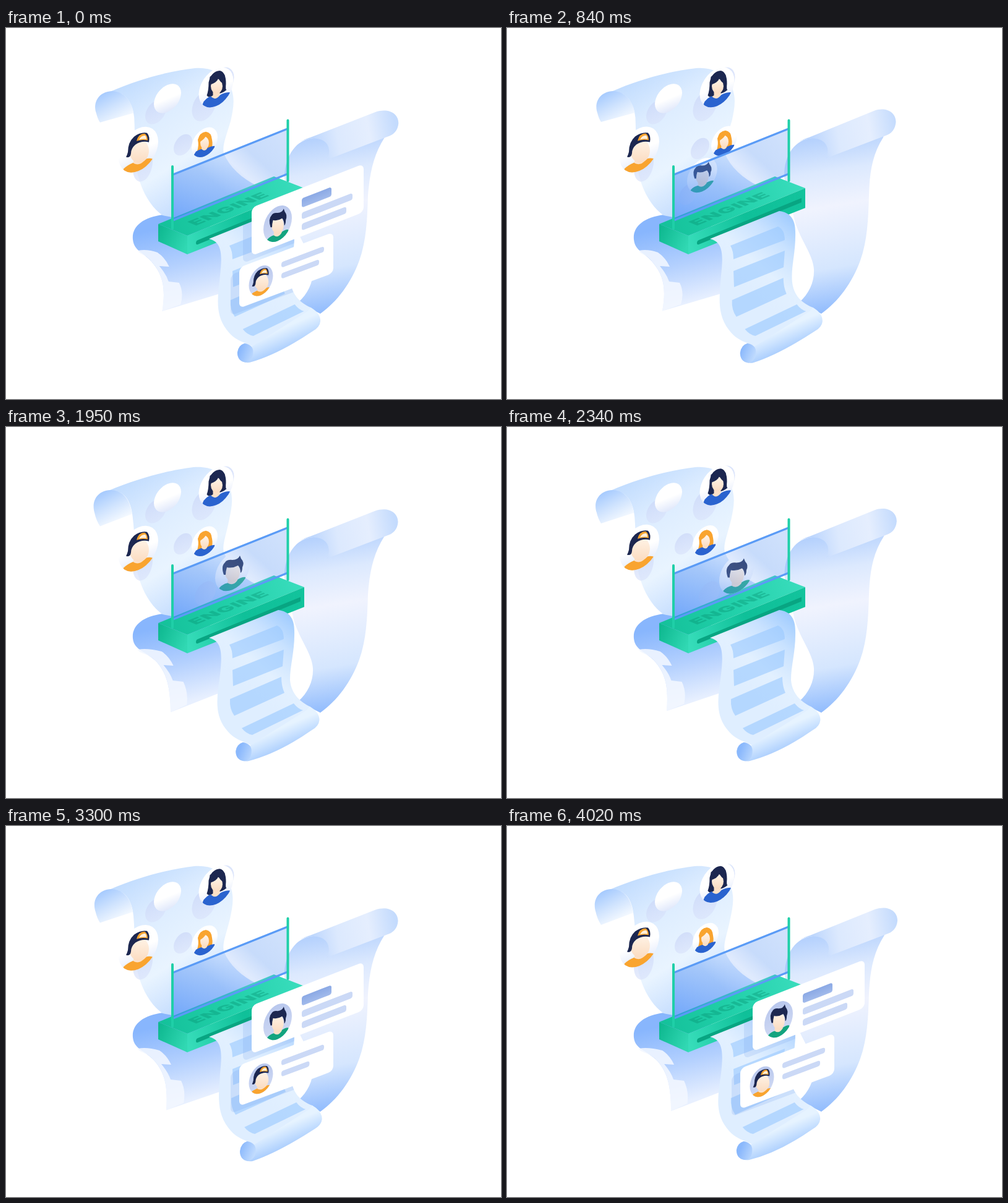
Animation, 800 px wide and 600 px high, one loop 4050 ms. Source, as an HTML page:

```html
<!DOCTYPE html>
<html lang="en">
<head>
<meta charset="utf-8">
<title>Engine</title>
<style>
html, body { margin: 0; width: 100%; height: 100%; overflow: hidden; background: #fff; }
svg { display: block; width: 100vw; height: 100vh; }
text { font: 900 22px Inter, Roboto, sans-serif; letter-spacing: .5px; }
</style>
</head>
<body>
<svg viewBox="0 0 800 600">
  <defs id="defs"></defs>

  <path id="tail" fill="url(#gTail)"/>
  <path id="flap" fill="#f3f8ff" opacity=".88"/>
  <path id="leftSheet" fill="url(#gLeft)"/>
  <path id="leftCurl" fill="url(#gCurl)"/>

  <g id="shades" fill="url(#gShade)"></g>
  <g id="discs"></g>

  <path id="rightSheet" fill="url(#gRight)"/>
  <path id="rightRoll" fill="url(#gRoll)"/>

  <path d="M246 317L433 240L482 259L293 336Z" fill="url(#gTop)"/>
  <path d="M246 317L293 336V366L246 345Z" fill="url(#gSide)"/>
  <path d="M293 336L482 259V291L293 366Z" fill="url(#gFront)"/>
  <path d="M310 343L476 275V282L310 350Q307 351 307 348Q307 344 310 343Z" fill="#08a582"/>
  <text transform="matrix(1.4 -.57 .9 .37 306 320)" fill="#05906f" opacity=".36">ENGINE</text>

  <g id="guest"></g>

  <path d="M270 237L455 163V236L270 311Z" fill="url(#gGlass)"/>
  <path d="M270 237L455 163M270 311L455 236" stroke="#5a9bf6" stroke-width="3.2"/>
  <path d="M269 224V324M455.5 149.500V247" stroke="#1fcfa8" stroke-width="4" stroke-linecap="round"/>

  <path id="outSheet" fill="url(#gOut)"/>
  <path id="stripes" fill="#9ccaff" opacity=".62"/>
  <g clip-path="url(#sheetClip)" fill="#7ea9ee" opacity=".22">
    <g id="bigShadow"></g>
    <g id="smallShadow"></g>
  </g>
  <path id="outRoll" fill="url(#gOutRoll)"/>
  <path id="outEnd" fill="url(#gOutEnd)"/>

  <g id="small"></g>
  <g id="big"></g>
</svg>

<script>
const LOOP = 4050, RESTART = 330, TAIL_TIME = 4600;
const NAVY = '#1c2750', BLUE = '#2a63cf', ORANGE = '#f9a42f', GREEN = '#14a47f';
const $ = id => document.getElementById(id);
const attr = (id, name, value) => $(id).setAttribute(name, value);
const clamp = v => Math.max(0, Math.min(1, v));
const ramp = (t, a, b) => { const k = clamp((t - a) / (b - a)); return k * k * (3 - 2 * k); };
const wave = (t, peak, period) => Math.cos(2 * Math.PI * (t - peak) / period);

// Gradients: id, axis in stage pixels (or null for the shape's own box), stops
function gradient(id, axis, ...stops) {
  const [x1, y1, x2, y2] = axis || [0, 0, 0, 1];
  const units = axis ? 'userSpaceOnUse' : 'objectBoundingBox';
  const list = stops.map(([at, color, alpha = 1]) =>
    `<stop offset="${at}" stop-color="${color}" stop-opacity="${alpha}"/>`).join('');
  return `<linearGradient id="${id}" gradientUnits="${units}" x1="${x1}" y1="${y1}" x2="${x2}" y2="${y2}">${list}</linearGradient>`;
}

const skewCircle = (r, stretch = 1.08, extra = '') =>
  `<circle r="${r}" transform="matrix(1 -.41 0 ${stretch} 0 0)" ${extra}/>`;
const clip = (id, shape) => `<clipPath id="${id}">${shape}</clipPath>`;

$('defs').innerHTML =
  gradient('gLeft', [165, 90, 300, 310], [0, '#bcd9fe'], [.3, '#dcecff'], [.65, '#e9f4ff'], [1, '#bdd8fe']) +
  gradient('gCurl', [160, 104, 185, 150], [0, '#a7cbfe'], [.5, '#cfe3fe'], [1, '#f4f9ff']) +
  gradient('gTail', [262, 320, 292, 445], [0, '#88b6fd'], [.5, '#b3d0fe'], [1, '#e8f0ff']) +
  gradient('gRight', [480, 180, 525, 460], [0, '#b3d0fd'], [.2, '#dce9fe'], [.4, '#f0f3fe'], [.75, '#d5e6fe'], [1, '#90bbfd']) +
  gradient('gRoll', [485, 185, 630, 160], [0, '#b6d2fd'], [.35, '#dce9fe'], [.7, '#e5eefe'], [1, '#c4dbfd']) +
  gradient('gOut', [462, 302, 372, 410], [0, '#9dcafe'], [.35, '#c9e2ff'], [.7, '#e2f0ff'], [1, '#dfeeff']) +
  gradient('gOutRoll', [425, 495, 440, 530], [0, '#e6f3ff'], [.4, '#cce3ff'], [1, '#a3c9fd']) +
  gradient('gOutEnd', [378, 520, 404, 530], [0, '#8ab8fc'], [1, '#c5defe']) +
  gradient('gTop', [250, 320, 480, 255], [0, '#14c19a'], [.5, '#22d0aa'], [1, '#3addbd']) +
  gradient('gSide', [246, 330, 293, 350], [0, '#0fb991'], [1, '#31d8b3']) +
  gradient('gFront', [293, 350, 482, 275], [0, '#37ddba'], [.5, '#0fc099'], [1, '#12c39c']) +
  gradient('gGlass', [285, 320, 430, 160], [0, '#3f86f8', .62], [.4, '#5c97f4', .42],
    [.6, '#8fb6fa', .28], [.75, '#5090f3', .32], [1, '#6aa1f6', .32]) +
  gradient('gShade', null, [0, '#ccd8f8', .75], [1, '#d9e2fb', .65]) +
  gradient('gDisc', null, [0, '#fff'], [.5, '#fff'], [1, '#e0e8fb']) +
  gradient('gBadge', null, [0, '#b8c7ed'], [1, '#d2dbf4']) +
  gradient('gTitle', null, [0, '#8ba9e5'], [1, '#a1baeb']) +
  gradient('gSkin', null, [0, '#fff4e8'], [1, '#fbdcc1']) +
  clip('sheetClip', '<path id="sheetShape"/>') +
  [['cap', 32], ['girl', 28], ['blonde', 21], ['guy', 28]].map(([n, r]) => clip(n + 'Clip', skewCircle(r))).join('') +
  clip('bigClip', skewCircle(23, 1.22)) + clip('smallClip', skewCircle(19.5, 1.2));

const shape = (d, fill) => `<path d="${d}" fill="${fill}"/>`;
const skin = (x, y, rx, ry) => `<ellipse cx="${x}" cy="${y}" rx="${rx}" ry="${ry}" fill="url(#gSkin)"/>`;
const people = {
  cap: shape('M-34 50L-24 31Q-18 25 -8 21Q4 23 12 15Q18 13 23 15L36 50Z', ORANGE) +
    shape('M-8 10L10 6V17Q2 27 -8 22Z', '#fce0c6') + skin(1, 2, 16, 19) +
    shape('M-17 4Q-17 -12 -7 -21Q4 -29 14 -27Q19 -21 17 -12Q5 -15 -5 -8Q-12 -2 -12 6Q-13 14 -20 12Q-18 8 -17 4Z', NAVY) +
    shape('M-3 -14Q0 -26 10 -26Q15 -23 15 -15Q6 -17 -3 -14Z', ORANGE) +
    shape('M1 -16Q4 -23 11 -23Q13 -21 13 -17Q7 -18 1 -16Z', '#fff0dc'),
  girl: shape('M-15 13Q-12 5 -12 -8Q-8 -26 6 -27Q16 -25 16 -6Q15 4 17 4Q10 10 3 10L-6 14Q-12 18 -15 13Z', NAVY) +
    shape('M-27 40L-20 23Q-15 17 -9 14Q-2 21 7 12Q14 8 22 8L29 40Z', BLUE) +
    shape('M-5 6H6V13Q-1 22 -8 15L-5 13Z', '#fce0c6') + skin(1, -2, 9.500, 12) +
    shape('M-11 -4Q1 -7 4 -15Q6 -8 13 -6L14 -20L2 -26L-10 -17Z', NAVY),
  blonde: shape('M-12 14Q-9 6 -11 -4Q-8 -16 2 -17Q11 -16 12 -4Q14 6 10 11Q0 17 -12 14Z', ORANGE) +
    shape('M-22 28L-14 15Q-9 12 -5 11Q0 15 5 9Q11 6 16 6L22 28Z', BLUE) +
    shape('M-4 6H4V10Q1 16 -5 11Z', '#fce0c6') + skin(0, 1, 7, 10) +
    shape('M-9 0Q-1 -4 2 -10Q5 -6 9 -4L8 -12L0 -15L-7 -11Z', ORANGE),
  guy: shape('M-32 44L-21 27Q-16 21 -7 19Q0 23 8 14Q16 9 21 10L32 44Z', GREEN) +
    shape('M-7 10L8 6V15Q1 25 -8 19Z', '#fce0c6') + skin(0, 2, 12, 15) +
    shape('M-14 6Q-19 -8 -12 -14Q-9 -19 0 -18Q9 -18 12 -25L14 -20Q20 -14 16 -6Q16 1 13 3Q13 -5 9 -9Q0 -4 -9 -6Q-11 0 -11 6Z', NAVY)
};
const disc = (name, r) => skewCircle(r, 1.08, 'fill="url(#gDisc)"') +
  `<g clip-path="url(#${name}Clip)">${people[name]}</g>`;

const at = (x, y, inner, id = '') => `<g ${id && `id="${id}"`} transform="translate(${x} ${y})">${inner}</g>`;
$('shades').innerHTML = at(242, 136, skewCircle(17)) + at(320, 126, skewCircle(19.5, 1.2)) +
  at(221, 222, skewCircle(16, 1.6)) + at(286, 189, skewCircle(15), 'blondeShade') +
  at(0, 0, skewCircle(17), 'guestShade');
$('discs').innerHTML = at(261, 114, skewCircle(22, 1, 'fill="url(#gDisc)"')) +
  at(347, 88, skewCircle(21.5, 1.08, 'fill="#dce5fb"'), 'girlBack') +
  at(0, 0, disc('girl', 28), 'girl') + at(0, 0, disc('cap', 32), 'cap') + at(0, 0, disc('blonde', 21), 'blonde');
$('guest').innerHTML = disc('guy', 28);

// Cards are laid out around their centre; bars are [x, y, width, height, fill, start, end]
const cards = {
  big: {
    w: 181, h: 78, slope: -.39, x: 487.5, y: 292.2, badge: [-48.5, 22.5, 23, 1.22, 2550, 2800],
    person: 'guy', fit: [.82, .97, 2760, 3000],
    bars: [[81, 17, 48, 15, 'url(#gTitle)', 2420, 2800], [81, 40, 82, 11, '#cbd9f6', 2450, 2820],
      [81, 58, 72, 11, '#cbd9f6', 2560, 2920]]
  },
  small: {
    w: 152, h: 66, slope: -.375, x: 453, y: 394, badge: [-41, 17, 19.5, 1.2, 2780, 3000],
    person: 'cap', fit: [.72, .75, 2880, 3120],
    bars: [[68, 17, 69, 9, '#cbd9f6', 2900, 3200], [68, 35, 61, 9, '#cbd9f6', 3060, 3420]]
  }
};
for (const [name, c] of Object.entries(cards)) {
  const plate = `<rect width="${c.w}" height="${c.h}" rx="8"/>`;
  const bars = c.bars.map(([x, y, w, h, fill], i) =>
    `<rect id="${name}Bar${i}" x="${x}" y="${y}" width="${w}" height="${h}" rx="3.500" fill="${fill}"/>`).join('');
  const [bx, by, r, stretch] = c.badge;
  $(name).innerHTML = `<g id="${name}Plate" fill="#fff">${plate}${bars}</g>` + at(bx, by,
    `<g id="${name}Badge">${skewCircle(r, stretch, 'fill="url(#gBadge)"')}</g>
     <g clip-path="url(#${name}Clip)"><g id="${name}Person">${people[c.person]}</g></g>`);
  $(name + 'Shadow').innerHTML = `<g id="${name}ShadowPlate">${plate}</g>`;
}

function drawPaper(t, u) {
  const l = wave(u, 1800, 2000), b = wave(u, 1150, 2000), r = wave(t, 1720, 1810);
  const tipX = 259 + 8 * l, tipY = 459.5 + 2 * l, k = 4 * l;

  attr('tail', 'd', `M254 302C220 306 203 322 205 342C207 362 ${226 + k / 2} 363 ${241 + k} 381
    C${256 + k} 399 ${262 + k} 420 ${tipX} ${tipY}L348 429V330L300 306Z`);
  attr('flap', 'd', `M213 360Q228 357 ${248 + k} 363Q${260 + k} 371 ${267 + k} 386L${251 + k} 385
    Q${262 + k} 398 ${266 + k} 410L${283 + k} 412Q${291 + k} 428 ${287 + 1.5 * k} ${448 + k / 4}L${tipX} ${tipY}
    C${262 + k} 420 ${256 + k} 399 ${241 + k} 381C${226 + k / 2} 363 218 369 213 360Z`);

  const x = -1.5 * l;
  attr('leftSheet', 'd', `M${167 + x} 103C220 80 270 69 ${304 + x} 65C330 63 347 72 ${356 + x} 86
    C${372 + x} 108 ${366 + x} 130 ${362 + x} 150C356 175 349 190 352 203C362 226 382 245 412 258
    L300 312L253 303C235 290 221 268 213 238C207 205 209 180 ${206 + x} 145C${203 + x} 115 188 101 ${167 + x} 103Z`);
  attr('leftCurl', 'd', `M152 ${156.5 + 4.5 * l}L${205 + x} ${139 + 2 * l}C${201 + x} 113 186 102 ${170 + x} 102
    C${148 + x} 103 ${139 + x} 121 ${144.5 + x} ${138 + l}Q${147 + x} ${149 + 2 * l} 152 ${156.5 + 4.5 * l}Z`);

  const q = 2 * r;
  attr('rightSheet', 'd', `M${449 + q / 2} 242C${449 + q} 205 ${468 + q} 180 ${495 + q} 178L${612 + q} 170
    L${610 + q} 177C${592 + q} 205 ${587 + q / 2} 235 585 270C584 310 582 345 571 376C558 412 535 443 508 462
    L472 444C489 429 497 410 496 390C494 365 475 345 465 312Z`);
  attr('rightRoll', 'd', `M${474 + q} 184Q${480 + q} 180 ${490 + q} 177L${595 + q} ${135 + r}
    C${615 + 1.5 * q} ${128 + r} ${631.5 + 3 * r} ${137 + r} ${631.5 + 3 * r} ${153 + r}
    Q${630 + 3 * r} ${170 + r} ${614 + q} ${175 + r}L${517 + q} ${212 + r}
    C${525 + q} 196 ${518 + q} 181 ${501 + q} 179Q${487 + q} 177 ${474 + q} 184Z`);

  const s = 2.5 * b;
  const sheet = `M328 341L440 296C457 298 466 309 466 329C467 362 459 385 ${460 + s / 2} 409
    C${462 + s / 2} 433 477 445 ${493 + s} 452L${505 + s} 466L${402 + s} 517
    C${386 + s} 507 ${372 + s} 508 ${357 + s} 488C${337 + s} 462 ${343 + s / 2} 432 346 400C349 371 351 346 328 341Z`;
  attr('outSheet', 'd', sheet);
  attr('sheetShape', 'd', sheet);
  attr('stripes', 'd', `M361 352L438 321Q449 326 449 343L366 374Q366 360 361 352ZM366 393L449 360L447 387L367 419Z
    M${363 + s / 2} 440L${446 + s / 2} 404Q${446 + s / 2} 419 ${451 + s / 2} 430L${370 + s / 2} 467Q${362 + s / 2} 456 ${363 + s / 2} 440Z
    M${383 + s} 487L${467 + s} 447Q${474 + s} 456 ${482 + s} 458L${400 + s} 498Q${390 + s} 496 ${383 + s} 487Z`);
  const e = 4 * b, endX = 508.5 + 2.5 * b;
  attr('outRoll', 'd', `M${387 + e} 510L${398 + e} 515L${488 + s} 458Q${492 + s} 453 ${493 + s} 452
    Q${endX} 461 ${endX} 474Q${endX - 1} 484 ${endX - 12} 490Q440 528 ${395 + e} ${541 + b}
    C${381 + e} ${543 + b} ${374.5 + e} ${534 + b} ${374.5 + e} ${525 + b}Q${376 + e} 513 ${387 + e} 510Z`);
  attr('outEnd', 'd', `M${386 + e} 510C${394 + e} 511 ${401 + e} 516 ${400 + e} 525
    C${400 + e} 536 ${394 + e} 540 ${388 + e} ${541 + b}C${378 + e} ${540 + b} ${374.5 + e} ${533 + b} ${374.5 + e} ${525 + b}
    Q${376 + e} 513 ${386 + e} 510Z`);
}

function drawPeople(u, bob) {
  const move = (id, x, y, scale = 1) => attr(id, 'transform', `translate(${x} ${y}) scale(${scale})`);
  const aside = ramp(u, 420, 800) - ramp(u, 900, 1320);
  move('cap', 214, 194.3 + 2.7 * bob);
  move('girl', 339.5, 94 + 2.3 * bob);
  move('girlBack', 347, 87 + 1.5 * bob);
  move('blonde', 321 + 30 * aside, 183 + 2 * bob - 2 * aside);
  move('blondeShade', 286 + 26 * aside, 189 + 6 * aside);

  const enter = ramp(u, 450, 1250), leave = ramp(u, 2250, 2800);
  const x = 268 + 98 * enter + 67 * leave;
  const size = Math.min(1, enter * 1.8);
  move('guest', x, 243 - 10 * enter + 60 * leave, size);
  attr('guest', 'opacity', 1 - ramp(u, 2600, 2860));
  move('guestShade', x - 3 - 41 * enter, 269, size);
  attr('guestShade', 'opacity', 1 - ramp(u, 2250, 2500));
}

function drawCards(u, bob) {
  const place = (name, grow, dx, dy, size, tall) => {
    const c = cards[name], x = c.x + dx, y = c.y + dy;
    const skew = `matrix(1 ${c.slope} 0 ${tall} 0 0) translate(${-c.w / 2} ${-c.h / 2})`;
    const opacity = Math.min(1, grow * 6);
    attr(name, 'transform', `translate(${x} ${y}) scale(${size})`);
    attr(name, 'opacity', opacity);
    attr(name + 'Plate', 'transform', skew);
    attr(name + 'Shadow', 'transform', `translate(${x - 14} ${y + 12}) scale(${size})`);
    attr(name + 'Shadow', 'opacity', opacity);
    attr(name + 'ShadowPlate', 'transform', skew);
    c.bars.forEach(([, , w, , , a, b], i) => attr(name + 'Bar' + i, 'width', w * ramp(u, a, b)));
    attr(name + 'Badge', 'transform', `scale(${ramp(u, c.badge[4], c.badge[5])})`);
    const [fx, fy, a, b] = c.fit, pop = ramp(u, a, b);
    attr(name + 'Person', 'transform', `translate(0 ${20 * (1 - pop)}) scale(${fx * pop} ${fy * pop})`);
  };
  const big = ramp(u, 2350, 2740), small = ramp(u, 2560, 2880);
  place('big', big, 0, 60 * (1 - big) + 2 * bob, big, 1);
  place('small', small, -20 * (1 - small), 100 * (1 - small) - 2.5 * bob * small, .6 + .4 * small, .42 + .58 * small);
}

function render(t) {
  const u = t < RESTART ? t + TAIL_TIME : t;
  const bob = -wave(u, 1380, 1325);
  drawPaper(t, u);
  drawPeople(u, bob);
  drawCards(u, bob);
}

const start = performance.now();
function tick() {
  render((performance.now() - start) % LOOP);
  requestAnimationFrame(tick);
}
tick();
</script>
</body>
</html>
```
